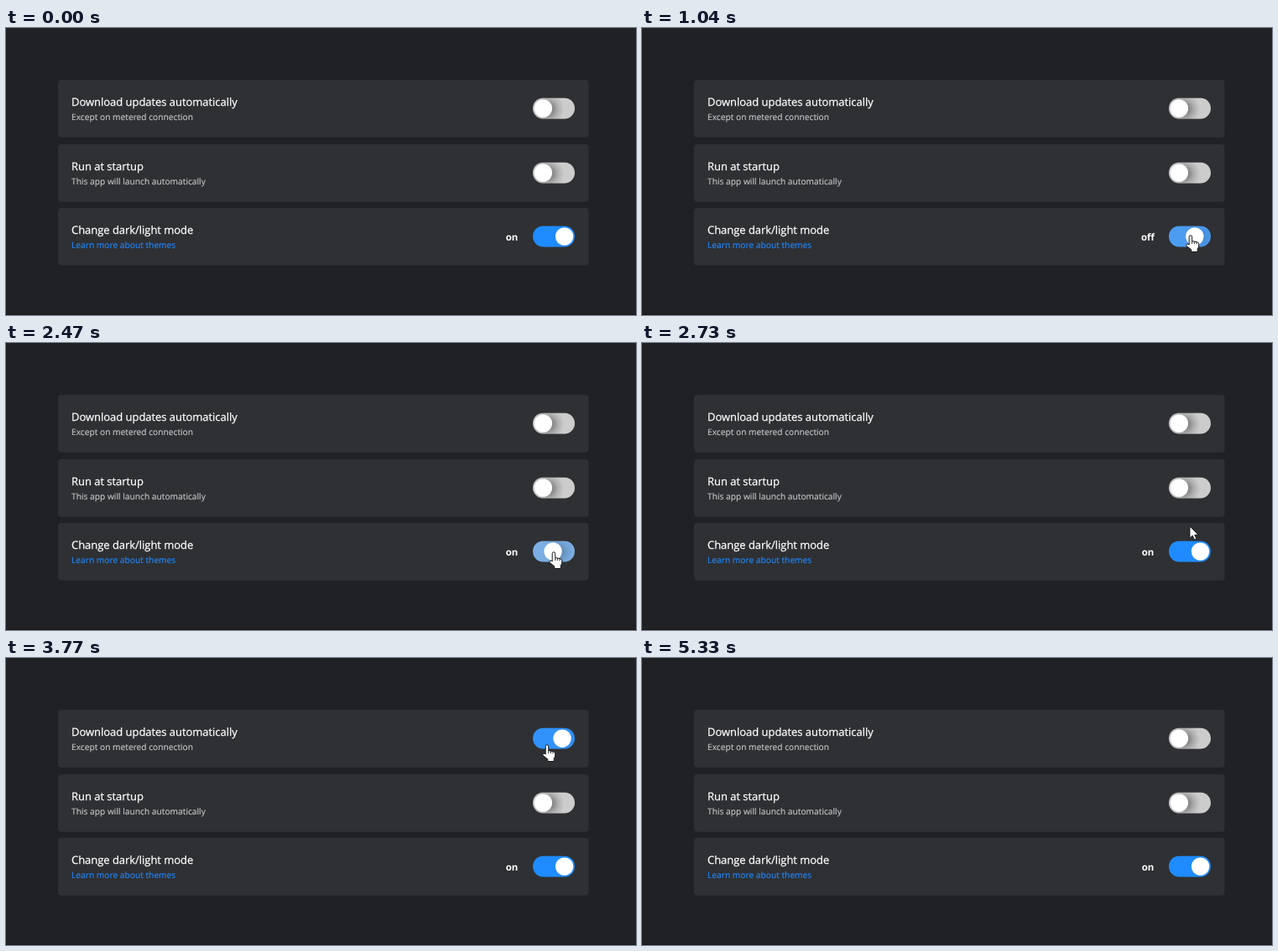
Animation, 751 px wide and 343 px high, one loop 5.98 s. Source, as an HTML page:

```html
<!DOCTYPE html>
<html lang="en">
<head>
<meta charset="utf-8">
<title>Settings toggles</title>
<style>
  html, body { margin: 0; width: 100%; height: 100%; overflow: hidden; background: #202124; }
  svg { display: block; width: 751px; height: 343px; }
  text { font-family: "Open Sans", "Noto Sans", sans-serif; text-rendering: geometricPrecision; }
  .row { fill: #2f3033; }
  .title { font-size: 13px; letter-spacing: -.04px; fill: #fff; stroke: #fff; stroke-width: .25px; }
  .note { font-size: 10.22px; fill: #c4c5c7; stroke: #c4c5c7; stroke-width: .15px; }
  .link { fill: #2087fa; stroke: #2087fa; }
  .state { font-size: 11.5px; font-weight: 700; fill: #fff; text-anchor: middle; }
  .cursor path { fill: #fff; stroke: #17181a; stroke-width: 1; stroke-linejoin: round; }
  .cursor .lines { fill: none; stroke-width: .9; }
</style>
</head>
<body>
<svg viewBox="0 0 751 343">
  <defs>
    <radialGradient id="shade">
      <stop offset=".3" stop-color="#000" stop-opacity=".34"/>
      <stop offset=".65" stop-color="#000" stop-opacity=".13"/>
      <stop offset="1" stop-color="#000" stop-opacity="0"/>
    </radialGradient>
    <clipPath id="pill"><rect width="50" height="25.4" rx="12.7"/></clipPath>
  </defs>
  <rect width="751" height="343" fill="#202124"/>
  <rect y="342" width="751" height="1" fill="#181417"/>
  <g id="rows"></g>
  <text id="state" class="state" x="603" y="254.3">on</text>
  <g id="cursor" class="cursor">
    <path id="arrow" d="M0 0V14.2L3.3 11.2L5.6 16.2L8 15.1L5.8 10.3H10.2Z"/>
    <g id="hand">
      <path d="M-1.8 11V1.6a1.75 1.75 0 0 1 3.5 0V6.6l6 1.2q2 .5 2 2.4v3l-1.5 3.2v3.1h-7.4v-2.6L-4.8 12.6q-.8-1.7.5-2.3t2.5.7z"/>
      <path class="lines" d="M1.7 6.6V10M4.4 7.3V10.2M7 7.8V10.4"/>
    </g>
  </g>
</svg>
<script>
const LOOP = 5980, TICK = 130, FADE = 400;
const $ = id => document.getElementById(id);

const rows = [
  ["Download updates automatically", "Except on metered connection", ""],
  ["Run at startup", "This app will launch automatically", ""],
  ["Change dark/light mode", "Learn more about themes", "link"]
];
const rowTop = i => Math.round(62 + 76.6 * i);

$("rows").innerHTML = rows.map(([title, note, kind], i) => `
  <g transform="translate(62 ${rowTop(i)})">
    <rect class="row" width="632.5" height="68.7" rx="4"/>
    <text class="title" x="16" y="31.2">${title}</text>
    <text class="note ${kind}" x="16" y="48">${note}</text>
    <g transform="translate(566 21.4)" clip-path="url(#pill)">
      <rect class="track" width="50" height="25.4"/>
      <g class="knob">
        <circle class="shade" cx="6" cy="1" r="19" fill="url(#shade)"/>
        <circle r="10.7" fill="#fff"/>
      </g>
    </g>
  </g>`).join("");
const tracks = document.querySelectorAll(".track");
const knobs = document.querySelectorAll(".knob");
const shades = document.querySelectorAll(".shade");

// Per switch: initial value and the times it is clicked
const switches = [
  { on: 0, clicks: [3522, 4735] },
  { on: 0, clicks: [] },
  { on: 1, clicks: [965, 2360] }
];

// Cursor hot spot: time, x, y
const path = [
  [130, 688, 333], [260, 679, 311], [390, 669, 287], [520, 660, 267],
  [650, 655, 253], [780, 654, 248], [1560, 654, 248], [1690, 653, 251.5],
  [2470, 653, 250], [2600, 653, 241], [2730, 653, 219], [2860, 651, 172],
  [2990, 647, 122], [3120, 645, 108], [3250, 645, 104], [4030, 645, 104],
  [4810, 647, 104], [4940, 649, 114], [5070, 658, 182], [5200, 671, 292],
  [5330, 678, 360]
];

const mix = (a, b, p) => a + (b - a) * p;

// cubic-bezier(.25, .1, .25, 1)
function ease(x) {
  if (x <= 0) return 0;
  if (x >= 1) return 1;
  const curve = (a, b, s) => 3 * a * s * (1 - s) ** 2 + 3 * b * s * s * (1 - s) + s ** 3;
  let lo = 0, hi = 1;
  for (let i = 0; i < 20; i++) {
    const mid = (lo + hi) / 2;
    if (curve(.25, .25, mid) < x) lo = mid; else hi = mid;
  }
  return curve(.1, 1, lo);
}

function valueAt({ on, clicks }, t) {
  let value = on;
  for (const c of clicks) {
    if (t < c) break;
    value = mix(on, 1 - on, ease((t - c) / FADE));
    on = 1 - on;
  }
  return { value, on };
}

function drawSwitch(i, t) {
  const { value, on } = valueAt(switches[i], t);
  const rgb = [[204, 30], [204, 139], [204, 255]].map(([a, b]) => Math.round(mix(a, b, value)));
  tracks[i].setAttribute("fill", `rgb(${rgb})`);
  knobs[i].setAttribute("transform", `translate(${mix(12.4, 37.6, value)} 12.7)`);
  shades[i].setAttribute("opacity", 1 - value);
  if (i === 2) $("state").textContent = on ? "on" : "off";
}

function drawCursor(t) {
  const k = path.findIndex(p => p[0] > t);
  $("cursor").style.display = k > 0 ? "" : "none";
  if (k < 1) return;
  const [a, b] = [path[k - 1], path[k]];
  // Long gaps are rests
  const p = b[0] - a[0] > TICK ? 0 : (t - a[0]) / (b[0] - a[0]);
  const x = mix(a[1], b[1], p), y = mix(a[2], b[2], p);
  const over = x > 628 && x < 678 && rows.some((_, i) => Math.abs(y - rowTop(i) - 34) < 13);
  $("cursor").setAttribute("transform", `translate(${x} ${y})`);
  $("hand").style.display = over ? "" : "none";
  $("arrow").style.display = over ? "none" : "";
}

function draw(now) {
  const t = Math.floor((now % LOOP) / TICK) * TICK;
  switches.forEach((_, i) => drawSwitch(i, t));
  drawCursor(t);
}

const start = performance.now();
function loop() {
  draw(performance.now() - start);
  requestAnimationFrame(loop);
}
loop();
</script>
</body>
</html>
```
